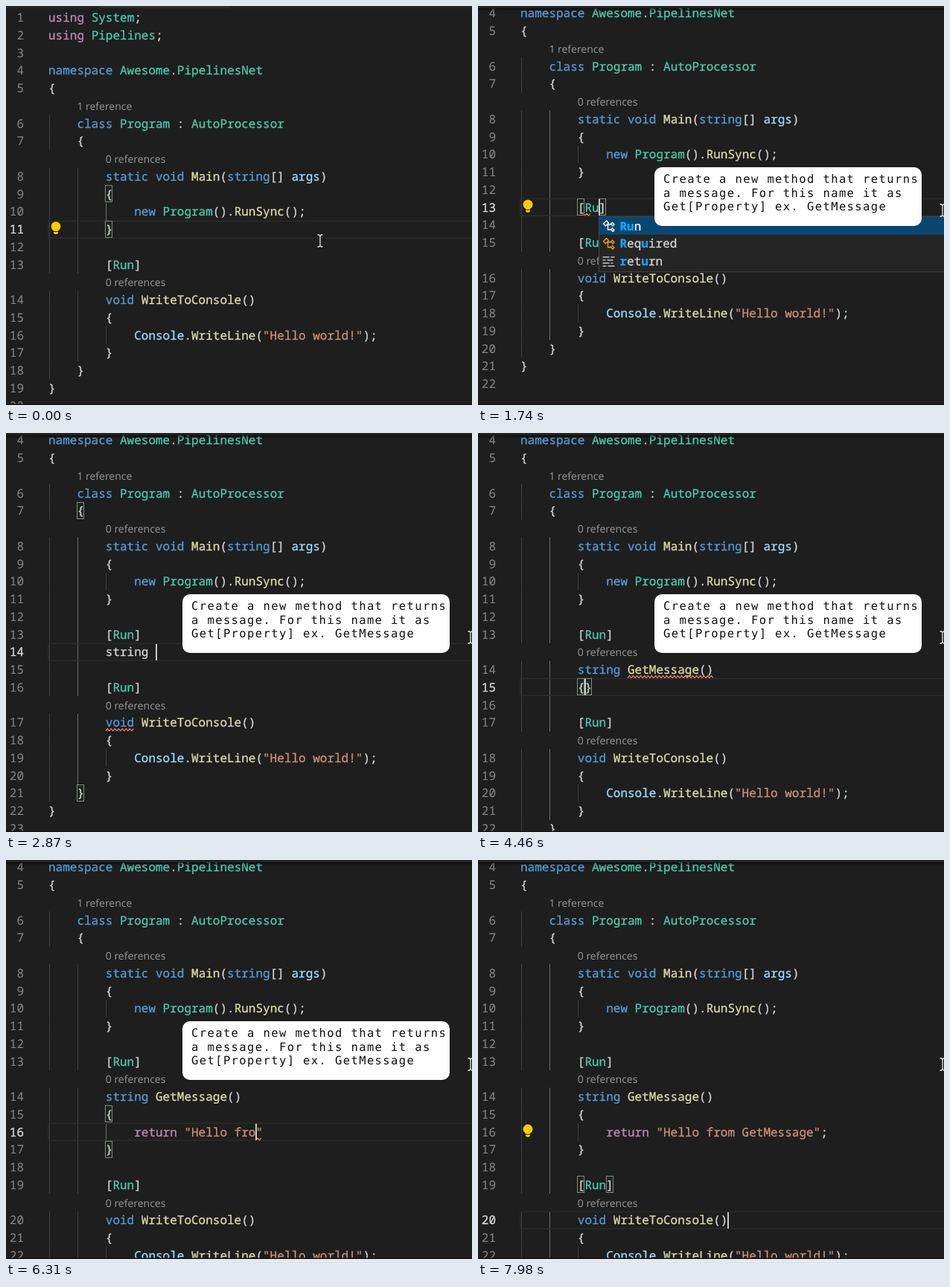
These frames come from a looping animation (626x537 px, 8 s). An HTML page:

```html
<!DOCTYPE html>
<html lang="en">
<head>
<meta charset="utf-8">
<title>Code editor</title>
<style>
html, body { margin: 0; width: 100%; height: 100%; overflow: hidden; background: #1e1e1e; }
svg { display: block; width: 626px; height: 537px; }
text { white-space: pre; text-rendering: geometricPrecision; }
.code text { font: 16px "Noto Sans Mono", monospace; }
.code text, .code tspan { fill: currentColor; stroke: currentColor; stroke-width: .3; }
.code .num { stroke-width: .1; }
.code .lens { font: 14px "Open Sans", sans-serif; color: #999; stroke: none; }
.code .bold { font-weight: 700; }
.note text { font: 15.5px "DejaVu Sans Mono", monospace; letter-spacing: 1.39px; fill: #111; }
</style>
</head>
<body>
<svg id="stage" viewBox="0 0 626 537" xmlns="http://www.w3.org/2000/svg"></svg>
<script>
const LOOP = 8000, ROW = 23.76, CH = 9.6, LEFT = 57, TOP = 3.5, SCROLL = 77;
const IN8 = " ".repeat(8), IN12 = " ".repeat(12);

// Lines holding "@" are reference hints and carry no line number.
const HEAD = `using System;
using Pipelines;

namespace Awesome.PipelinesNet
{
    @1 reference
    class Program : AutoProcessor
    {
        @0 references
        static void Main(string[] args)
        {
            new Program().RunSync();
        }`.split("\n");
const TAIL = `        [Run]
        @0 references
        void WriteToConsole()
        {
            Console.WriteLine("Hello world!");
        }
    }
}
`.split("\n");

// Completion lists: icon kind, then label.
const MENUS = {
  attr: "a Run,a Required,k return,k ref",
  types: "k string,k static,k struct,k short,k switch,k sizeof,k stackalloc,k sbyte,k sealed,c String,c StringComparer,s StringComparison",
  stmt: "k return,c Result,a RequiredAttribute,c EndResult,c InfoResult,c ErrorResult,i IAsyncResult,c AsyncResult,c RenderResult,c RoutingTable,s RuntimeArgumentHandle,c ErrorEndResult"
};
const ICONS = {
  a: ["#ee9d28", "M1 5l4-4 3 3-4 4zM6 6h5M7 6v7h4M11 5.5l2-2 2.5 2.5-2 2zM11 13l2-2 2.5 2.5-2 2z"],
  k: ["#c5c5c5", "M0 2.5h9M11 2.5h5M0 6.5h4M6 6.5h8M0 10.5h9M11 10.5h3M0 14.5h5M7 14.5h9"],
  c: ["#b180d7", "M8 1l6.5 3v7.5L8 15l-6.5-3.5V4zM1.5 4L8 7.5 14.5 4M8 7.5V15"],
  i: ["#75beff", "M0 8h8M1 7v2M8.5 8a3.5 3.5 0 1 0 7 0a3.5 3.5 0 1 0-7 0"],
  s: ["#c5c5c5", "M1 2h14v4H1zM1 10h5v4.5H1zM10 10h5v4.5h-5z"]
};

// Editing script: the inserted lines and caret after each key press.
const keys = [];
const at = (t, mid, line, col, extra) => keys.push({ t, mid, line, col, squiggles: [], ...extra });
const type = (t, step, prefix, word, put) =>
  [...word].forEach((_, i) => put(t + i * step, prefix + word.slice(0, i + 1)));

at(-600, [""], 11, 9, { bulb: 11 });
at(1060, [IN8, ""], 12, 8);
at(1280, ["", IN8, ""], 13, 8);

const attr = (t, s) => at(t, ["", IN8 + `[${s}]`, ""], 13, 9 + s.length, {
  bulb: 13, menu: s && "attr", typed: s, squiggles: s.length > 1 ? [[13, 9, s.length - 1]] : []
});
attr(1540, "");
attr(1610, "R");
attr(1700, "Ru");
attr(1860, "Run");

const run = ["", IN8 + "[Run]"];
at(2150, [...run, ""], 13, 13);
const decl = (t, s, extra) => at(t, [...run, IN8 + s, ""], 14, 8 + s.length, extra);
decl(2280, "");
type(2410, 65, "", "string", (t, s) => decl(t, s, { menu: "types", typed: s }));
decl(2810, "string ", { squiggles: [[17, 8, 4]] });
type(2990, 66, "string ", "GetMessage", decl);

const lens = [...run, IN8 + "@0 references"];
const sig = [...lens, IN8 + "string GetMessage()"];
const noReturn = [14, 15, 12];
at(3720, [...lens, IN8 + "string GetMessage", ""], 14, 25);
at(3850, [...sig, ""], 14, 26);
at(3980, [...sig, ""], 14, 27);
at(4120, [...sig, IN8, ""], 15, 8);
at(4380, [...sig, IN8 + "{}", ""], 15, 9, { squiggles: [noReturn] });

const method = s => [...sig, IN8 + "{", IN12 + s, IN8 + "}", ""];
const body = (t, s, col, extra) => at(t, method(s), 16, 12 + col, extra);
body(4530, "", 0, { squiggles: [noReturn] });
type(4660, 100, "", "return", (t, s) => body(t, s, s.length, {
  menu: "stmt", typed: s, squiggles: [noReturn, [16, 12, s.length]]
}));
body(5260, "return ", 7);

const say = (t, s) => body(t, `return "${s}"`, 8 + s.length, { squiggles: [[16, 20 + s.length, 1]] });
say(5400, "");
type(5470, 65, "", "Hello", say);
type(5800, 130, "Hello", " fro", say);
type(6385, 90, "Hello fro", "m G", say);
type(6640, 65, "Hello from G", "etMessage", say);
const done = 'return "Hello from GetMessage"';
body(7230, done, done.length, { squiggles: [[16, 41, 1]] });
body(7360, done + ";", done.length + 1);
[[7570, 17, 9], [7700, 18, 0], [7830, 19, 13], [7955, 20, 29]].forEach(([t, line, col]) =>
  at(t, method(done + ";"), line, col, { bulb: 16 }));

const keyAt = t => keys.filter(k => k.t <= t).pop() || keys[0];
const clamp = v => Math.max(0, Math.min(1, v));
const ease = (t, a, b) => { const p = clamp((t - a) / (b - a)); return p * p * (3 - 2 * p); };
const colX = col => LEFT + col * CH;
const guideX = col => Math.round(colX(col) + .5);
const indent = s => s.search(/\S|$/);
const rect = (x, y, w, h, fill, more = "") =>
  `<rect x="${x}" y="${y}" width="${w}" height="${h}" fill="${fill}" ${more}/>`;
const span = (s, color, cls = "") => `<tspan color="${color}" class="${cls}">${s}</tspan>`;

function wordColor(word, rest) {
  if (word[0] === '"') return "#ce9178";
  if (!/\w/.test(word)) return "#d4d4d4";
  if (/^(using|return)$/.test(word)) return "#c586c0";
  if (word === "string" && !rest.trim()) return "#d4d4d4";
  if (/^(namespace|class|static|void|new|string)$/.test(word)) return "#569cd6";
  if (rest[0] === "(" && word !== "Program") return "#dcdcaa";
  if (/^[A-Z]/.test(word) && !/^(Console|G)/.test(word)) return "#4ec9b0";
  return "#9cdcfe";
}

const paint = line => line.replace(/"[^"]*"|\w+|[^\w"]+/g,
  (w, i) => span(w, wordColor(w, line.slice(i + w.length))));

function bracketPairs(lines) {
  const open = [], pairs = [];
  lines.forEach((text, i) => [...text].forEach((ch, col) => {
    const pos = { line: i + 1, col };
    if ("([{".includes(ch)) open.push(pos);
    else if (")]}".includes(ch) && open.length) pairs.push([open.pop(), pos]);
  }));
  return pairs;
}

// A pair touching the caret wins over the innermost pair around it.
function findPair(pairs, { line, col }) {
  const touches = b => b.line === line && (b.col === col || b.col === col - 1);
  const order = b => b.line * 1000 + b.col, here = line * 1000 + col;
  return pairs.find(p => p.some(touches)) ||
    pairs.find(([a, b]) => order(a) < here && here <= order(b));
}

function squiggle(x, y, width) {
  let d = `M${x} ${y + 3}`;
  for (let i = 1; i * 2.5 <= width; i++) d += `L${x + i * 2.5} ${y + (i % 2 ? 0 : 3)}`;
  return `<path d="${d}" fill="none" stroke="#f48771" stroke-width="1.1"/>`;
}

const bulb = y => `<circle cx="67" cy="${y + 7.5}" r="6.4" fill="#fc0"/>` +
  `<path d="M64 ${y + 11}h6v3h-6zM64 ${y + 15}h6v1.5l-1.5 1.5h-3l-1.5-1.5z" fill="#fc0"/>`;

// Positions of the typed letters inside a label, in any order.
function matches(label, typed) {
  const low = label.toLowerCase(), hit = new Set();
  let last = -1;
  [...typed.toLowerCase()].forEach((ch, n) => {
    let i = n ? low.indexOf(ch, last + 1) : Math.max(label.lastIndexOf(ch.toUpperCase()), 0);
    if (i < 0) i = [...low].findIndex((c, j) => c === ch && !hit.has(j));
    hit.add(i);
    last = i;
  });
  return hit;
}

function menuBox(key, rowTop) {
  const items = MENUS[key.menu].split(",").map(s => [s[0], s.slice(2)])
    .filter(([, label]) => [...key.typed.toLowerCase()].every(c => label.toLowerCase().includes(c)));
  const h = items.length * ROW + 4;
  return { items, h, x: Math.floor(colX(key.col)), y: Math.round(key.line > 13 ? rowTop - h - 1 : rowTop + ROW) };
}

function drawMenu({ items, x, y, h }, typed, hover) {
  let out = rect(x + .5, y + .5, 520, h - 1, "#252526", 'stroke="#454545"');
  items.forEach(([kind, label], i) => {
    const top = y + 1 + i * ROW, [color, d] = ICONS[kind], hit = matches(label, typed);
    const over = hover && hover > top && hover < top + ROW;
    if (!i || over) out += rect(x + 1, top, 518, ROW, i ? "#2a2d2e" : "#094771");
    out += `<path transform="translate(${x + 5.5} ${top + 4})" d="${d}" fill="none" stroke="${i ? color : "#fff"}" stroke-width="1.4"/>`;
    out += `<text x="${x + 28.5}" y="${top + 17.5}">` +
      [...label].map((c, j) => hit.has(j) ? span(c, "#18a3ff", "bold") : span(c, i ? "#d4d4d4" : "#fff")).join("") + "</text>";
  });
  return out;
}

function drawNote(opacity) {
  const lines = ["Create a new method that returns", "a message. For this name it as", "Get[Property] ex. GetMessage"];
  return `<g class="note" opacity="${opacity}">` + rect(237, 217, 359, 79, "#fff", 'rx="10"') +
    lines.map((s, i) => `<text x="249" y="${238.3 + i * 18.4}">${s}</text>`).join("") + "</g>";
}

function drawMouse(x, y, hand) {
  const d = hand
    ? "M-2 1q1-1.5 3 0v9h6v13h-5l-5-6-4-5q0-2 2-1.5l3 3z"
    : "M-3.5-8h2l1.5 1.5 1.5-1.5h2M0-6.5v13M-3.5 8h2l1.5-1.5 1.5 1.5h2";
  const style = hand ? 'fill="#fff" stroke="#111" stroke-width=".8"' : 'fill="none" stroke="#e4e4e4" stroke-width="1.3"';
  return `<path transform="translate(${x} ${y})" d="${d}" ${style}/>`;
}

function draw(t) {
  const key = keyAt(t), scroll = SCROLL * ease(t, 70, 360);
  const rows = [...HEAD, ...key.mid, ...TAIL];
  const lines = [], tops = [];
  let under = "", text = "", over = "";

  rows.forEach((row, i) => {
    const y = TOP + i * ROW - scroll;
    if (row.includes("@")) {
      text += `<text class="lens" x="${colX(indent(row))}" y="${y + 17.5}">${row.trim().slice(1)}</text>`;
      return;
    }
    const depth = row ? indent(row) : lines.length ? indent(lines[lines.length - 1]) : 0;
    lines.push(row);
    tops[lines.length] = y;
    for (let col = 0; col < depth; col += 4) under += rect(guideX(col), y, 1, ROW, "#404040");
    const active = lines.length === key.line;
    text += `<text x="24" y="${y + 17.5}" text-anchor="end" ${active ? 'color="#dcdcdc"' : 'class="num" color="#858585"'}>${lines.length}</text>`;
    if (row.trim()) text += `<text x="${colX(indent(row))}" y="${y + 17.5}">${paint(row.trimStart())}</text>`;
  });

  const pairs = bracketPairs(lines);
  const block = findPair(pairs.filter(([a, b]) => a.line < b.line), key);
  if (block) {
    for (let n = block[0].line + 1; n < block[1].line; n++)
      under += rect(guideX(block[0].col), tops[n], 1, ROW, "#707070");
  }

  const caretY = tops[key.line];
  under += rect(LEFT, Math.round(caretY) + .5, 580, ROW - 1, "none", 'stroke="#2b2b2b" stroke-width="1.5"');

  // Bracket boxes trail the caret slightly.
  const late = keyAt(t - 60);
  const match = findPair(pairs, late.mid.join() === key.mid.join() ? late : key) || [];
  match.forEach(b => {
    under += rect(Math.floor(colX(b.col)) + .5, Math.round(tops[b.line]) + .5, 9, 22, "#1c241c", 'stroke="#888"');
  });

  key.squiggles.forEach(([line, col, n]) => { over += squiggle(colX(col), tops[line] + 20, n * CH); });
  if (key.bulb) over += bulb(tops[key.bulb] + .5);
  if ((t - key.t) % 1000 < 500) over += rect(Math.floor(colX(key.col)), Math.round(caretY) + 1, 2, 22, "#c8c8c8");

  const go = ease(t, 800, 1050), mx = 422 + 202 * go, my = 316 - 41 * go;
  const menu = key.menu && menuBox(key, caretY);
  const hand = menu && my > menu.y && my < menu.y + menu.h;
  if (menu) over += drawMenu(menu, key.typed, hand && my);

  let edge = rect(0, 0, 626, 3, "#252526") + rect(126, 0, 176, 3, "#2d2d2d");
  if (scroll > 0) edge = rect(0, 0, 626, 3, "#222") + rect(0, 3, 626, 2, "#000", 'opacity=".45"') + rect(0, 5, 626, 2, "#000", 'opacity=".15"');
  edge += rect(0, 535.5, 626, 1.5, "#1a1215");

  const note = Math.min(clamp((t - 330) / 330), 1 - clamp((t - 7570) / 380));
  return rect(0, 0, 626, 537, "#1e1e1e") + `<g class="code">${under}${text}${over}</g>` +
    edge + (note > 0 ? drawNote(note) : "") + drawMouse(mx, my, hand);
}

const stage = document.getElementById("stage");
const start = performance.now();
let shown = "";
function tick() {
  const picture = draw((performance.now() - start) % LOOP);
  if (picture !== shown) stage.innerHTML = shown = picture;
  requestAnimationFrame(tick);
}
tick();
</script>
</body>
</html>
```
